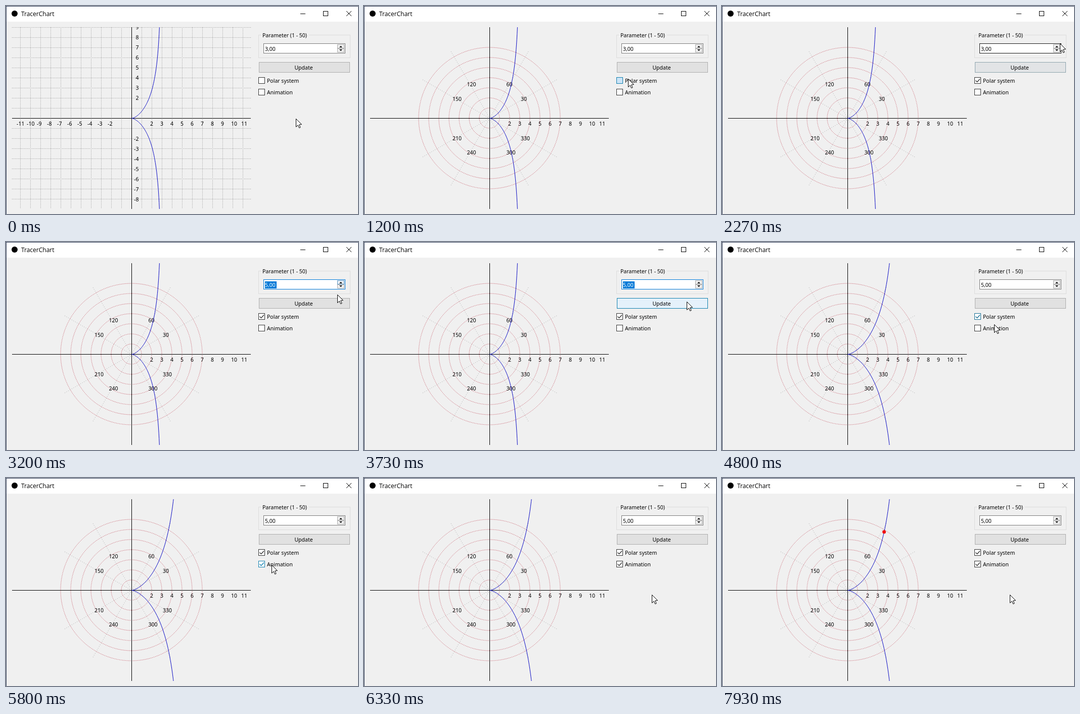
Write an HTML page with a canvas that moves like this. It is 696x412 px and loops after 8000 ms.

```html
<!DOCTYPE html>
<html lang="en">
<head>
<meta charset="utf-8">
<title>TracerChart</title>
<style>
  html, body { margin: 0; width: 100%; height: 100%; overflow: hidden; background: #f0f0f0; }
  canvas { display: block; width: 696px; height: 412px; }
</style>
</head>
<body>
<canvas id="stage" width="696" height="412"></canvas>
<script>
const ctx = document.getElementById('stage').getContext('2d');
const LOOP = 8000, TICK = 200 / 3;
const OX = 248.5, OY = 222.5, UNIT = 20;
const UI = '10.5px "Noto Sans", "Open Sans", sans-serif';
const TITLE = '12px "Open Sans", "Noto Sans", sans-serif';
const BLUE = '#0078d7';

// Pointer stops: time, x, y
const PATH = [
  [0, 573, 223], [730, 522, 144], [1610, 522, 144], [2270, 668, 74],
  [2470, 663, 78], [2930, 663, 78], [3330, 653, 112], [3670, 638, 118],
  [4200, 638, 118], [4800, 538, 163], [5070, 524, 170], [5740, 524, 170],
  [6330, 569, 231], [LOOP, 569, 231]
];

const clamp = v => Math.max(0, Math.min(1, v));
const ease = v => v * v * (3 - 2 * v);
const rad = deg => deg * Math.PI / 180;
const pulse = (t, on, off, rise = 130, fall = 270) =>
  clamp((t - on) / rise) * (1 - clamp((t - off) / fall));

function pointerAt(t) {
  let i = 0;
  while (i < PATH.length - 2 && t >= PATH[i + 1][0]) i++;
  const [t0, x0, y0] = PATH[i], [t1, x1, y1] = PATH[i + 1];
  const k = ease(clamp((t - t0) / (t1 - t0)));
  return [Math.round(x0 + (x1 - x0) * k), Math.round(y0 + (y1 - y0) * k)];
}

function mix(a, b, k) {
  const part = (hex, i) => parseInt(hex.slice(i, i + 2), 16);
  const c = [1, 3, 5].map(i => Math.round(part(a, i) + (part(b, i) - part(a, i)) * k));
  return `rgb(${c})`;
}

function text(s, x, y, color = '#000', font = UI, align = 'left') {
  ctx.font = font;
  ctx.textAlign = align;
  ctx.fillStyle = color;
  ctx.fillText(s, x, y);
}

function line(color, ...pts) {
  ctx.strokeStyle = color;
  ctx.beginPath();
  for (let i = 0; i < pts.length; i += 2) ctx.lineTo(pts[i], pts[i + 1]);
  ctx.stroke();
}

function fill(color, x, y, w, h) {
  ctx.fillStyle = color;
  ctx.fillRect(x, y, w, h);
}

function box(x, y, w, h, back, edge) {
  fill(back, x, y, w, h);
  ctx.strokeStyle = edge;
  ctx.strokeRect(x + 0.5, y + 0.5, w - 1, h - 1);
}

function disc(color, x, y, r) {
  ctx.fillStyle = color;
  ctx.beginPath();
  ctx.arc(x, y, r, 0, 7);
  ctx.fill();
}

function titleBar() {
  fill('#fff', 0, 0, 696, 31);
  disc('#000', 17, 15, 6);
  text('TracerChart', 30, 20, '#000', TITLE);
  line('#000', 582, 15.5, 592, 15.5);
  ctx.strokeRect(627.5, 10.5, 9, 9);
  line('#000', 673, 10, 683, 20);
  line('#000', 683, 10, 673, 20);
  fill('#34405c', 0, 0, 696, 1);
  fill('#34405c', 0, 0, 1, 412);
}

function cartesianGrid() {
  ctx.setLineDash([1, 2]);
  for (let n = -11; n <= 11; n++) line('#8c8c8c', OX + n * UNIT, 42, OX + n * UNIT, 402);
  for (let n = -8; n <= 9; n++) line('#8c8c8c', 12, OY - n * UNIT, 484, OY - n * UNIT);
  ctx.setLineDash([]);
  for (let n = 2; n <= 11; n++) text('-' + n, 241 - n * UNIT, 237);
  for (let n = 2; n <= 9; n++) {
    text(n, 256.5, 226 - n * UNIT);
    if (n < 9) text('-' + n, 253, 227 + n * UNIT);
  }
}

function polarGrid() {
  ctx.setLineDash([1, 3]);
  for (let a = 30; a < 360; a += 30) {
    if (a % 90) line('#a0a0a0', OX, OY, OX + 156 * Math.cos(rad(a)), OY - 156 * Math.sin(rad(a)));
  }
  ctx.setLineDash([1, 2]);
  ctx.strokeStyle = '#b81c30';
  for (let n = 1; n <= 7; n++) {
    ctx.beginPath();
    ctx.arc(248, 222, n * UNIT, 0, 2 * Math.PI);
    ctx.stroke();
  }
  ctx.setLineDash([]);
  for (let a = 30; a < 360; a += 30) {
    if (a % 90) text(a, 242.5 + 78 * Math.cos(rad(a)), 226.8 - 78 * Math.sin(rad(a)));
  }
}

// Cissoid r = p sin²φ / cos φ
function cissoid(p, deg) {
  const s = Math.sin(rad(deg)), c = Math.cos(rad(deg));
  return [OX + UNIT * p * s * s, OY - UNIT * p * s * s * s / c];
}

function chart(t) {
  const p = t < 3995 ? 3 : 5;
  ctx.save();
  ctx.beginPath();
  ctx.rect(12, 42, 472, 360);
  ctx.clip();
  if (t < 1195) cartesianGrid(); else polarGrid();
  for (let n = 2; n <= 11; n++) text(n, 245 + n * UNIT, 237);
  line('#000', 12, OY, 484, OY);
  line('#000', OX, 42, OX, 402);
  const pts = [];
  for (let a = -80; a <= 80; a++) pts.push(...cissoid(p, a));
  line('#0c0cc4', ...pts);
  if (t >= 7060) disc('#f01010', ...cissoid(p, 65.35 - 7.25 * (t - 7067) / 866), 3.5);
  ctx.restore();
}

function spinBox(t) {
  const focus = t >= 2460 && t < 3990;
  const value = t < 2530 ? '3,00' : t < 2795 ? '4,00' : '5,00';
  const selected = t >= 2530 && focus;
  const edge = focus ? BLUE : mix('#7a7a7a', '#171717', pulse(t, 2070, 2460, 130, 1));
  box(509, 74, 162, 20, '#fff', edge);
  if (selected) fill(BLUE, 512, 78, 23, 14);
  text(value, 512, 89, selected ? '#fff' : '#000');
  const hot = pulse(t, 2330, 3060);
  const down = pulse(t, 2525, 2600, 1, 60) + pulse(t, 2790, 2870, 1, 60);
  const back = mix('#f0f0f0', down > 0 ? '#cce4f7' : '#e5f1fb', hot);
  box(655, 76, 14, 8, back, mix('#acacac', BLUE, hot));
  box(655, 84, 14, 8, '#f0f0f0', '#acacac');
  for (const [y, d] of [[82, -3], [86, 3]]) {
    ctx.fillStyle = '#000';
    ctx.beginPath();
    ctx.moveTo(659, y);
    ctx.lineTo(665, y);
    ctx.lineTo(662, y + d);
    ctx.fill();
  }
}

function button(t) {
  const hot = Math.max(pulse(t, 1860, 2050, 130, 270), pulse(t, 3260, 4450));
  const down = pulse(t, 3930, 4000, 60, 200);
  const back = down ? mix('#e5f1fb', '#cce4f7', down) : mix('#e1e1e1', '#e5f1fb', hot);
  box(500, 111, 180, 21, back, mix('#adadad', '#0f7fae', hot));
  text('Update', 588.5, 126, '#000', UI, 'center');
}

function checkBox(y, label, hot, down, checked) {
  const edge = mix('#333333', '#0f7fae', hot);
  box(499, y, 13, 13, mix('#ffffff', '#cce4f7', down), edge);
  if (checked) {
    ctx.globalAlpha = checked;
    ctx.lineWidth = 1.3;
    line(edge, 501.5, y + 6.5, 504.5, y + 9.5, 510, y + 3.5);
    ctx.lineWidth = 1;
    ctx.globalAlpha = 1;
  }
  text(label, 516, y + 11);
}

function panel(t) {
  ctx.strokeStyle = '#dcdcdc';
  ctx.strokeRect(499.5, 57.5, 181, 45);
  fill('#f0f0f0', 505, 56, 94, 4);
  text('Parameter (1 - 50)', 507, 62);
  spinBox(t);
  button(t);
  checkBox(141, 'Polar system',
    Math.max(pulse(t, 540, 1800), pulse(t, 4530, 4740)),
    pulse(t, 1070, 1200, 60, 130), clamp((t - 1200) / 130));
  checkBox(164, 'Animation',
    pulse(t, 4810, 5940), pulse(t, 5140, 5270, 60, 200), clamp((t - 5270) / 200));
}

function pointer(t) {
  const [x, y] = pointerAt(t);
  ctx.save();
  ctx.translate(x + 0.5, y + 0.5);
  ctx.beginPath();
  const shape = [0, 0, 0, 16, 3.7, 12.5, 6.2, 18, 8.6, 17, 6.2, 11.5, 11, 11];
  for (let i = 0; i < shape.length; i += 2) ctx.lineTo(shape[i], shape[i + 1]);
  ctx.closePath();
  ctx.fillStyle = '#fff';
  ctx.fill();
  ctx.strokeStyle = '#000';
  ctx.stroke();
  ctx.restore();
}

function draw(t) {
  ctx.lineWidth = 1;
  fill('#f0f0f0', 0, 0, 696, 412);
  titleBar();
  chart(t);
  panel(t);
  pointer(t);
}

const start = performance.now();
function frame() {
  const t = (performance.now() - start) % LOOP;
  draw(Math.floor((t + 3.5) / TICK) * TICK);
  requestAnimationFrame(frame);
}
frame();
</script>
</body>
</html>
```
